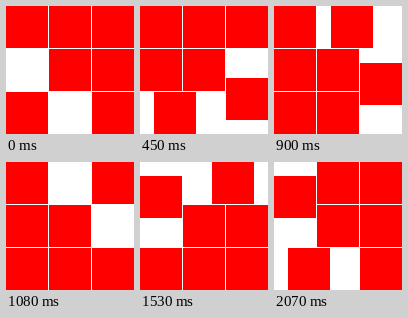
An HTML page with a canvas for the animation above (2160 ms loop, 128 by 128 pixels).

```html
<!DOCTYPE html>
<html>
<head>
<meta charset="utf-8">
<title>Sliding squares</title>
<style>
html, body { margin: 0; width: 100%; height: 100%; overflow: hidden; background: #fff; }
canvas { display: block; }
</style>
</head>
<body>
<canvas width="128" height="128"></canvas>
<script>
const ctx = document.querySelector('canvas').getContext('2d');
const STEP = 90, LOOP = 2160, PITCH = 43, SIZE = 42;
// Outer cells of the 3x3 grid, clockwise from the top left
const ring = [[0, 0], [1, 0], [2, 0], [2, 1], [2, 2], [1, 2], [0, 2], [0, 1]];
const start = performance.now();

const square = (x, y) => ctx.fillRect(x, y, SIZE, SIZE);

function draw(now) {
  const step = Math.floor((Math.max(0, now - start) % LOOP) / STEP);
  const phase = Math.floor(step / 3);
  const shift = Math.round(PITCH * (step % 3) / 3);

  ctx.clearRect(0, 0, 128, 128);
  ctx.fillStyle = '#f00';
  square(PITCH, PITCH);

  // Two squares slide clockwise, each into the hole ahead of it;
  // the moving group shifts back one cell per phase.
  ring.forEach(([x, y], i) => {
    const place = (i - 4 + phase + 8) % 8;
    if (place === 1 || place === 3) return;
    const d = place === 0 || place === 2 ? shift : 0;
    const [nx, ny] = ring[(i + 1) % 8];
    square(x * PITCH + (nx - x) * d, y * PITCH + (ny - y) * d);
  });
  requestAnimationFrame(draw);
}
draw(start);
</script>
</body>
</html>
```
